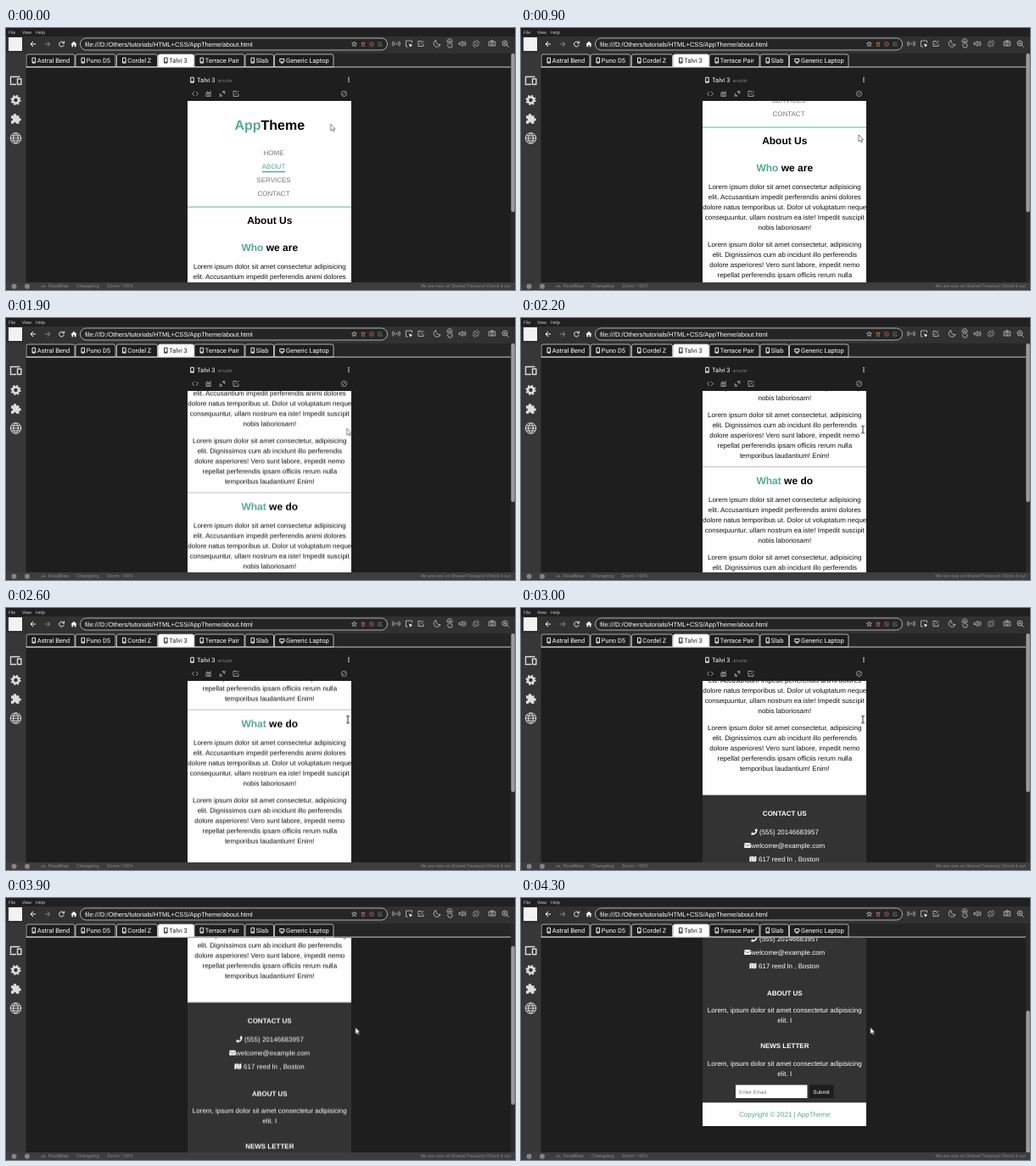
An HTML page for the animation above (5100 ms loop, 600 by 309 pixels).

```html
<!DOCTYPE html>
<html lang="en">
<head>
<meta charset="utf-8">
<title>Responsive page preview</title>
<style>
  html, body { margin: 0; width: 100%; height: 100%; overflow: hidden; background: #1e1e1e; }
  svg { display: block; width: 100vw; height: 100vh; }
  text { font-family: Roboto, sans-serif; text-rendering: geometricPrecision; white-space: pre; }
  .page text, .arial { font-family: "Liberation Sans", Arial, sans-serif; }
  .menu text { font-family: "Open Sans", sans-serif; }
</style>
</head>
<body>
<svg id="stage" viewBox="0 0 600 309">
  <defs>
    <clipPath id="workspace"><rect x="23" y="47" width="572" height="253"/></clipPath>
    <clipPath id="screen"><rect x="214.3" y="86" width="192.7" height="343"/></clipPath>
    <clipPath id="track"><rect x="595" y="30" width="5" height="270"/></clipPath>
  </defs>
</svg>
<script>
const LOOP = 5100, TICK = 100;
const GREEN = '#56aa8f', INK = '#111', CENTER = 310.8;
const bold = 'font-weight="700"';

const rect = (x, y, w, h, fill, more = '') =>
  `<rect x="${x}" y="${y}" width="${w}" height="${h}" fill="${fill}" ${more}/>`;
const dot = (x, y, r, fill, more = '') => `<circle cx="${x}" cy="${y}" r="${r}" fill="${fill}" ${more}/>`;
const text = (x, y, words, size, fill, more = '') =>
  `<text x="${x}" y="${y}" font-size="${size}" fill="${fill}" ${more}>${words}</text>`;
const centered = (y, words, size, fill, more = '', x = CENTER) =>
  text(x, y, words, size, fill, `text-anchor="middle" ${more}`);
const lines = (y, rows, fill) => rows.map((row, i) => centered(y + i * 12, row, 8, fill)).join('');

// Icon outlines are built around 0,0.
const line = (path, x, y, color = '#ddd', weight = .7, more = '') =>
  `<path d="${path}" transform="translate(${x} ${y}) ${more}" fill="none" stroke="${color}" stroke-width="${weight}" stroke-linejoin="round"/>`;
const solid = (path, x, y, color = '#fff') => `<path d="${path}" transform="translate(${x} ${y})" fill="${color}"/>`;
const ring = r => `M${r} 0A${r} ${r} 0 1 1 ${-r} 0A${r} ${r} 0 1 1 ${r} 0`;
const box = (w, h) => `M${-w / 2} ${-h / 2}h${w}v${h}h${-w}z`;
const star = r => 'M' + Array.from({ length: 10 }, (_, i) => {
  const a = i * Math.PI / 5, d = i % 2 ? r * .45 : r;
  return `${(d * Math.sin(a)).toFixed(2)} ${(-d * Math.cos(a)).toFixed(2)}`;
}).join('L') + 'Z';
const arrowPath = 'M-3 0H3M0-3L3 0L0 3';
const editPath = 'M1-3H-3V3H3V0M-1 1L3.5-3.5';
const phonePath = box(3.6, 6) + 'M-1.8 2H1.8';
const cameraPath = box(7.5, 5) + 'M-2-2.5L-1-3.7H1L2-2.5' + ring(1.5);

function toolIcons() {
  const y = 18.5;
  return line(ring(.5) + 'M-2-2Q-3.4 0-2 2M2-2Q3.4 0 2 2M-3.6-3Q-5.4 0-3.6 3M3.6-3Q5.4 0 3.6 3', 460, y)
    + line('M3.5-1V-3.5H-3.5V3.5H-1', 475, y) + solid('M0 0L4 1.5L1.5 4Z', 475, y)
    + line(editPath, 489, y)
    + line('M-1-4A4 4 0 1 0 4 1A4 4 0 0 1-1-4Z', 508, y)
    + line('M-1 1V-3H1V0L3 1V3L2 4.5H-1L-3 1M-2.4-1A3 3 0 1 1 2.4-1', 523, y)
    + line('M-4-1H-2L0-3V3L-2 1H-4ZM1.5-2Q3 0 1.5 2M3-3Q5 0 3 3', 538, y)
    + line(box(3, 6), 554, y, '#ddd', .7, 'rotate(-45)') + line('M1-4.3L4.3-1M-1 4.3L-4.3 1', 554, y)
    + line(cameraPath, 573, y)
    + line(ring(3) + 'M2 2L4.8 4.8M-1.5 0H1.5M0-1.5V1.5', 588, y - .5);
}

function appHeader() {
  const menu = [['File', 3], ['View', 19], ['Help', 35]].map(([w, x]) => text(x, 6.8, w, 5.1, '#ddd')).join('');
  return rect(0, 0, 600, 10, '#202021') + rect(0, 10, 600, 20, '#313132')
    + `<g class="menu">${menu}</g>` + rect(3, 11, 16, 16, '#f2f2f2')
    + line(arrowPath, 32, 19, '#fff', 1, 'scale(-1)') + line(arrowPath, 49, 19, '#888', 1)
    + line('M2.5-1.5A2.9 2.9 0 1 0 2.8 1M3-3.5V-1H.5', 65.5, 19, '#fff', .9)
    + solid('M-3.6 .2L0-3.3L3.6 .2H2.5V3.2H.8V1H-.8V3.2H-2.5V.2Z', 80, 19)
    + rect(87.5, 12, 362, 14, '#252526', 'rx="7" stroke="#d0d0d0" stroke-width=".8"')
    + text(93, 21.6, 'file:///D:/Others/tutorials/HTML+CSS/AppTheme/about.html', 7.55, '#fff', 'class="arial"')
    + line(star(3), 410.5, 19)
    + line(box(3, 4) + 'M-2.4-2H2.4M0-1V1', 421, 19.4, '#c86a6a')
    + line(ring(2.4) + 'M-1.7-1.7L1.7 1.7', 431, 19, '#c86a6a')
    + line(editPath, 441, 19, '#7fae86', .8, 'scale(.7)')
    + toolIcons();
}

function tabs() {
  const items = [['Astral Bend', 24, 57], ['Puno D5', 82, 47], ['Cordel Z', 130.5, 48], ['Talvi 3', 179.5, 42],
    ['Terrace Pair', 222, 59], ['Slab', 282, 33.5], ['Generic Laptop', 316.5, 69.5]];
  const boxes = items.map(([name, x, w], i) => {
    const active = i === 3, color = active ? '#1e1e1e' : '#fff', tx = x + 12.8;
    return `<path d="M${x} 46v-13q0-2 2-2h${w - 4}q2 0 2 2v13z" fill="${active ? '#fff' : '#1e1e1e'}" stroke="#d8d8d8" stroke-width=".8"/>`
      + line(i === 6 ? box(5, 3.5) + 'M-1.5 3H1.5M0 2V3' : phonePath, tx - 4, 38.2, color, .9)
      + text(tx + (i === 6 ? .8 : 0), 40.8, name, 7.5, color);
  });
  return rect(23, 30, 572, 16, '#252526') + boxes.join('') + rect(23, 45.6, 572, .9, '#dedede');
}

function sidebar() {
  const x = 11.5, gray = '#ddd';
  return rect(0, 30, 23.5, 270, '#373738')
    + line('M-6 3.5V-4.5H5M-7 4.5H.5M2-2H6.4V4.5H2Z', x, 62, gray, 1.4)
    + dot(x, 85, 3.5, 'none', `stroke="${gray}" stroke-width="2.6"`)
    + dot(x, 85, 5.2, 'none', `stroke="${gray}" stroke-width="1.8" stroke-dasharray="2.1 1.984"`)
    + rect(x - 5.5, 103.3, 9.5, 9.5, gray) + dot(x - 1, 102.8, 1.8, gray) + dot(x + 4.6, 108, 1.8, gray)
    + dot(x - 5, 108, 1.5, '#373738') + dot(x - 1, 112.4, 1.5, '#373738')
    + line(ring(6.3) + 'M0-6.3Q-6 0 0 6.3Q6 0 0-6.3M-6.3 0H6.3M-5.4-3H5.4M-5.4 3H5.4', x, 130, gray, 1);
}

function statusBar() {
  const gray = '#858585', y = 306.4;
  return rect(0, 300, 600, 9, '#3d3d3e') + dot(9.5, 304.8, 3, gray) + dot(25, 304.8, 3, gray)
    + line('M0-2V0M-2 2V0H2V2', 44, 304.6, gray)
    + text(50, y, 'RoadMap', 5.6, gray) + text(83, y, 'Changelog', 5.6, gray) + text(119, y, 'Zoom: 100%', 5.6, gray)
    + text(595, y, 'We are now on Shared Treasury! Check it out', 5.4, gray, 'text-anchor="end"');
}

function deviceBar() {
  const y = 77.5, gray = '#ccc';
  return line(phonePath, 219.5, 61.3, '#fff', .9) + text(225, 64.1, 'Talvi 3', 7.5, '#fff')
    + text(250, 63.8, '411x731', 4.4, '#aaa')
    + [-1, 0, 1].map(i => dot(404, 61 + i * 2.2, .8, '#fff')).join('')
    + line('M-1-2.4L-3.6 0L-1 2.4M1-2.4L3.6 0L1 2.4', 223, y, gray)
    + line(box(5.4, 4) + ring(1) + 'M1-2L3.2-4.4M-2-3.4H0', 238.6, y + 1, gray)
    + line('M-3.6 3.6L-1.5 1.5M3.6-3.6L1.5-1.5M-2.6 0L0 2.6L-1.5 3L-3 1.5ZM2.6 0L0-2.6L1.5-3L3-1.5Z', 255, y, gray)
    + line(editPath, 271, y, gray)
    + line(ring(3.1) + 'M-1.4 1.4L1.4-1.4', 398.5, y, gray);
}

function pageBody() {
  const first = ['Lorem ipsum dolor sit amet consectetur adipisicing', 'elit. Accusantium impedit perferendis animi dolores',
    'dolore natus temporibus ut. Dolor ut voluptatum neque', 'consequuntur, ullam nostrum ea iste! Impedit suscipit', 'nobis laboriosam!'];
  const second = ['Lorem ipsum dolor sit amet consectetur, adipisicing', 'elit. Dignissimos cum ab incidunt illo perferendis',
    'dolore asperiores! Vero sunt labore, impedit nemo', 'repellat perferendis ipsam officiis rerum nulla', 'temporibus laudantium! Enim!'];
  const accent = word => `<tspan fill="${GREEN}">${word}</tspan>`;
  const nav = ['HOME', 'ABOUT', 'SERVICES', 'CONTACT'].map((word, i) =>
    centered(149.8 + i * 16, word, 8, i === 1 ? GREEN : '#777', '', 315.5)).join('');
  const copy = y => lines(y, first, INK) + lines(y + 67.6, second, INK);
  return rect(214, 86, 194, 511, '#fefefe')
    + centered(119.6, accent('App') + 'Theme', 16, '#000', bold)
    + nav + rect(302, 168.8, 27, 1.5, GREEN) + rect(214, 210.6, 194, .9, GREEN)
    + centered(231.4, 'About Us', 12, '#000', bold)
    + centered(263.4, accent('Who') + ' we are', 12, '#000', bold) + copy(284)
    + rect(214, 410.2, 194, .6, '#999')
    + centered(431.3, accent('What') + ' we do', 12, '#000', bold) + copy(452);
}

function pageFooter() {
  const section = (y, title) => centered(y, title, 8, '#fff', bold)
    + lines(y + 20.5, ['Lorem, ipsum dolor sit amet consectetur adipisicing', 'elit. I'], '#fff');
  return rect(214, 596.6, 194, 240, '#333')
    + centered(620.8, 'CONTACT US', 8, '#fff', bold)
    + solid('M1.6-3.7L3.7-3Q3.6 3.5-3.2 3.7L-3.7 1.6L-1.6 .6L-.6 1.8Q1 1 1.8-.6L.6-1.6Z', 275, 640)
    + text(281, 642.8, '(555) 20146683957', 8, '#fff')
    + solid(box(7.6, 5.8), 267, 656) + line('M-3.8-2L0 1L3.8-2', 267, 656, '#333')
    + text(271, 658.6, 'welcome@example.com', 8, '#fff')
    + solid('M-4-2.4L-1.4-3.4L1.4-2.4L4-3.4V2.4L1.4 3.4L-1.4 2.4L-4 3.4Z', 273.4, 672)
    + line('M-1.4-3.4V2.4M1.4-2.4V3.4', 273.4, 672, '#333', .5)
    + text(280, 674.8, '617 reed ln , Boston', 8, '#fff')
    + section(706.8, 'ABOUT US') + section(769, 'NEWS LETTER')
    + rect(253, 812.5, 84.5, 15.5, '#fff') + text(257, 822.6, 'Enter Email', 6.25, '#777')
    + rect(340, 812.5, 28.5, 15.5, '#1d1d1d') + text(344.3, 822.6, 'Submit', 6.25, '#fff')
    + rect(214, 833.3, 194, 28, '#fefefe')
    + centered(849.7, 'Copyright © 2021 | AppTheme', 8, GREEN);
}

document.getElementById('stage').insertAdjacentHTML('beforeend',
  rect(0, 0, 600, 309, '#1e1e1e')
  + `<g clip-path="url(#workspace)"><g id="device">${deviceBar()}
      <g class="page" clip-path="url(#screen)"><g id="page">${pageBody() + pageFooter()}</g></g></g></g>`
  + appHeader() + tabs() + sidebar()
  + `<g clip-path="url(#track)">${rect(595, 30, 5, 270, '#2a2a2b')}<g id="thumb">${rect(595.4, 30, 4.4, 187, '#9c9c9c', 'rx="2"')}</g></g>`
  + statusBar()
  + `<g id="arrow"><path d="M0 0V8L1.9 6.3L3.2 9L4.4 8.4L3.2 5.8H5.6Z" fill="#fff" stroke="#333" stroke-width=".6"/></g>`
  + `<g id="beam">${line('M-2-4H2M0-4V4M-2 4H2', 0, 0, '#222', .9)}</g>`);

// Each glide: start in ms, number of ticks, distance.
const glides = {
  page: [[500, 5, 94], [1300, 3, 94], [1800, 5, 47], [2400, 7, 141], [3300, 3, 56]],
  outer: [[3900, 3, 160]],
  x: [[500, 5, 15.4], [1800, 3, 5], [3600, 3, 8.8]],
  y: [[500, 5, 12.8], [1800, 3, 5.5], [3600, 3, 21.1]]
};
const ease = p => p * p * (3 - 2 * p);
const travel = (name, ms) => glides[name].reduce((sum, [start, ticks, distance]) =>
  sum + distance * ease(Math.min(1, Math.max(0, (ms - start) / TICK + 1) / ticks)), 0);
const play = (id, pose) => {
  const frames = Array.from({ length: LOOP / TICK + 1 }, (_, i) =>
    ({ offset: i * TICK / LOOP, easing: 'step-end', ...pose(i * TICK) }));
  document.getElementById(id).animate(frames, { duration: LOOP, iterations: Infinity });
};
const move = (x, y) => ({ transform: `translate(${x}px, ${y}px)` });
const pointer = ms => move(382.6 + travel('x', ms), 113.2 + travel('y', ms));
const overText = ms => ms >= 2000 && ms < 3700 ? 1 : 0;

play('page', ms => move(0, -travel('page', ms)));
play('device', ms => move(0, -travel('outer', ms)));
play('thumb', ms => move(0, travel('outer', ms) * 103 / 160));
play('arrow', ms => ({ ...pointer(ms), opacity: 1 - overText(ms) }));
play('beam', ms => ({ ...pointer(ms), opacity: overText(ms) }));
</script>
</body>
</html>
```
